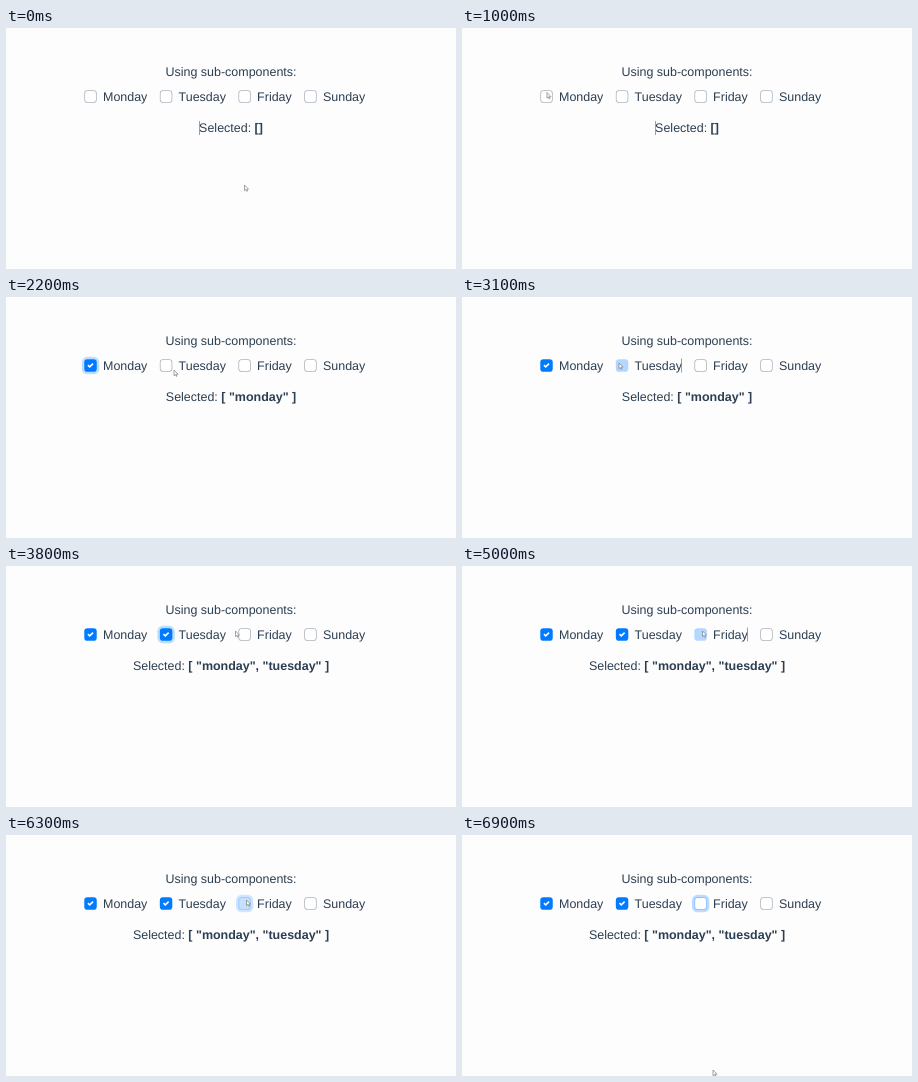
These frames come from a looping animation (450x241 px, 7 s). An HTML page with a canvas:

```html
<!DOCTYPE html>
<html lang="en">
<head>
<meta charset="utf-8">
<title>Checkbox group</title>
<style>
  html, body { margin: 0; width: 100%; height: 100%; overflow: hidden; background: #fdfdfe; }
  canvas { display: block; width: 450px; height: 241px; }
</style>
</head>
<body>
<canvas id="stage" width="450" height="241"></canvas>
<script>
const ctx = document.getElementById('stage').getContext('2d');
const LOOP = 7000, STEP = 100;
const REM = 12.48, BOX_Y = 62.3, MID = 225;
const INK = '#2c3e50';
const DAYS = ['Monday', 'Tuesday', 'Friday', 'Sunday'];

// Each click: day index, press time, release time
const CLICKS = [[0, 1300, 1500], [1, 3000, 3200], [2, 4900, 5200], [2, 6100, 6300]];

// Pointer stops: time, x, y
const PATH = [
  [0, 238.5, 157], [800, 89, 66], [1000, 85, 64.5], [1500, 85, 64.5],
  [2000, 169, 71.5], [2200, 168, 73], [2400, 145.5, 67], [2600, 157, 66],
  [3500, 157, 66], [3700, 196, 62.5], [3800, 229.5, 65], [4100, 262, 67],
  [4200, 262, 67], [4500, 252, 48], [4700, 240.5, 65], [6300, 240.5, 65],
  [6400, 242, 71], [6600, 250, 125], [6800, 254.5, 202], [6900, 251, 235]
];

const WHITE = [255, 255, 255], BLUE = [0, 123, 255], PALE = [179, 215, 255];
const GREY = [173, 181, 189], FOCUS = [128, 189, 255];

const TICK = new Path2D('M6.564.75l-3.59 3.612-1.538-1.55L0 4.26 2.974 7.25 8 2.193z');
const ARROW = new Path2D('M0 0V5.6L1.3 4.5L2.2 6.4L3 6L2.2 4.2H4Z');

const mix = (a, b, k) => a + (b - a) * k;
const mixColor = (a, b, k) => a.map((v, i) => mix(v, b[i], k));
const rgb = c => `rgb(${c.map(Math.round).join(',')})`;

function setFont(bold) {
  ctx.font = `${bold ? 'bold ' : ''}${REM}px "Liberation Sans", Arial, sans-serif`;
  ctx.textRendering = 'geometricPrecision';
}

function widthOf(text, bold) {
  setFont(bold);
  return ctx.measureText(text).width;
}

function write(text, x, y, bold) {
  setFont(bold);
  ctx.fillStyle = INK;
  ctx.fillText(text, x, y);
}

function layout() {
  const widths = DAYS.map(d => widthOf(d));
  const total = widths.reduce((sum, w) => sum + w + 2.5 * REM, 0);
  let x = MID - total / 2;
  return widths.map(w => {
    const item = { x, text: x + 1.5 * REM, end: x + 1.5 * REM + w };
    x += w + 2.5 * REM;
    return item;
  });
}

// State of the form after all presses and releases up to time t
function stateAt(t) {
  const s = { checked: [], focus: -1, pressed: -1, caret: -1, changed: -1e4 };
  for (const [day, down, up] of CLICKS) {
    if (t >= down) Object.assign(s, { pressed: day, caret: day, focus: -1, changed: down });
    if (t >= up) {
      const on = s.checked.includes(day);
      s.checked = on ? s.checked.filter(d => d !== day) : [...s.checked, day];
      Object.assign(s, { pressed: -1, focus: day, changed: up });
    }
  }
  return s;
}

function boxStyle(s, i) {
  const on = s.checked.includes(i), focus = s.focus === i;
  if (s.pressed === i) return { fill: PALE, edge: PALE, glow: 0, on };
  if (on) return { fill: BLUE, edge: BLUE, glow: focus ? 0.25 : 0, on };
  return { fill: WHITE, edge: focus ? FOCUS : GREY, glow: focus ? 0.25 : 0, on };
}

function roundBox(x, y, size, radius) {
  ctx.beginPath();
  ctx.roundRect(x, y, size, size, radius);
}

function drawBox(x, from, to, k) {
  const px = REM / 16, glow = mix(from.glow, to.glow, k);
  if (glow > 0) {
    const spread = 3.2 * px;
    roundBox(x - spread, BOX_Y - spread, REM + 2 * spread, 7.2 * px);
    ctx.fillStyle = `rgba(0,123,255,${glow})`;
    ctx.fill();
  }
  roundBox(x, BOX_Y, REM, 4 * px);
  ctx.fillStyle = rgb(mixColor(from.edge, to.edge, k));
  ctx.fill();
  roundBox(x + px, BOX_Y + px, REM - 2 * px, 3 * px);
  ctx.fillStyle = rgb(mixColor(from.fill, to.fill, k ** 4));
  ctx.fill();
  if (to.on) {
    ctx.save();
    ctx.translate(x + 4 * px, BOX_Y + 4 * px);
    ctx.scale(px, px);
    ctx.fillStyle = '#fff';
    ctx.fill(TICK);
    ctx.restore();
  }
}

function drawCaret(x, y) {
  ctx.fillStyle = '#7f8a96';
  ctx.fillRect(Math.floor(x), y, 0.8, 14);
}

function drawSelected(s) {
  const label = 'Selected: ';
  const names = s.checked.map(i => `"${DAYS[i].toLowerCase()}"`).join(', ');
  const value = names ? `[ ${names} ]` : '[]';
  const labelWidth = widthOf(label);
  const x = MID - (labelWidth + widthOf(value, true)) / 2;
  write(label, x, 104.1);
  write(value, x + labelWidth, 104.1, true);
  if (s.focus < 0 && s.caret < 0) drawCaret(x, 93);
}

function drawPointer(t) {
  let i = 0;
  while (i < PATH.length - 2 && t >= PATH[i + 1][0]) i++;
  const [t0, x0, y0] = PATH[i], [t1, x1, y1] = PATH[i + 1];
  const p = Math.min(1, (t - t0) / (t1 - t0)), k = p * p * (3 - 2 * p);
  ctx.save();
  ctx.translate(mix(x0, x1, k), mix(y0, y1, k));
  ctx.fillStyle = '#fff';
  ctx.fill(ARROW);
  ctx.strokeStyle = '#7d7d82';
  ctx.lineWidth = 0.7;
  ctx.stroke(ARROW);
  ctx.restore();
}

function draw(t) {
  ctx.fillStyle = '#fdfdfe';
  ctx.fillRect(0, 0, 450, 241);

  const title = 'Using sub-components:';
  write(title, MID - widthOf(title) / 2, 48.2);

  const now = stateAt(t), before = stateAt(now.changed - 1);
  const k = t - now.changed < STEP ? 0.7 : 1;
  layout().forEach((item, i) => {
    drawBox(item.x, boxStyle(before, i), boxStyle(now, i), k);
    write(DAYS[i], item.text, 72.9);
    if (now.pressed === i) drawCaret(item.end, 61.5);
  });
  drawSelected(now);
  drawPointer(t);
}

const start = performance.now();
function tick() {
  const t = (performance.now() - start) % LOOP;
  draw(Math.floor(t / STEP) * STEP);
  requestAnimationFrame(tick);
}
tick();
</script>
</body>
</html>
```
